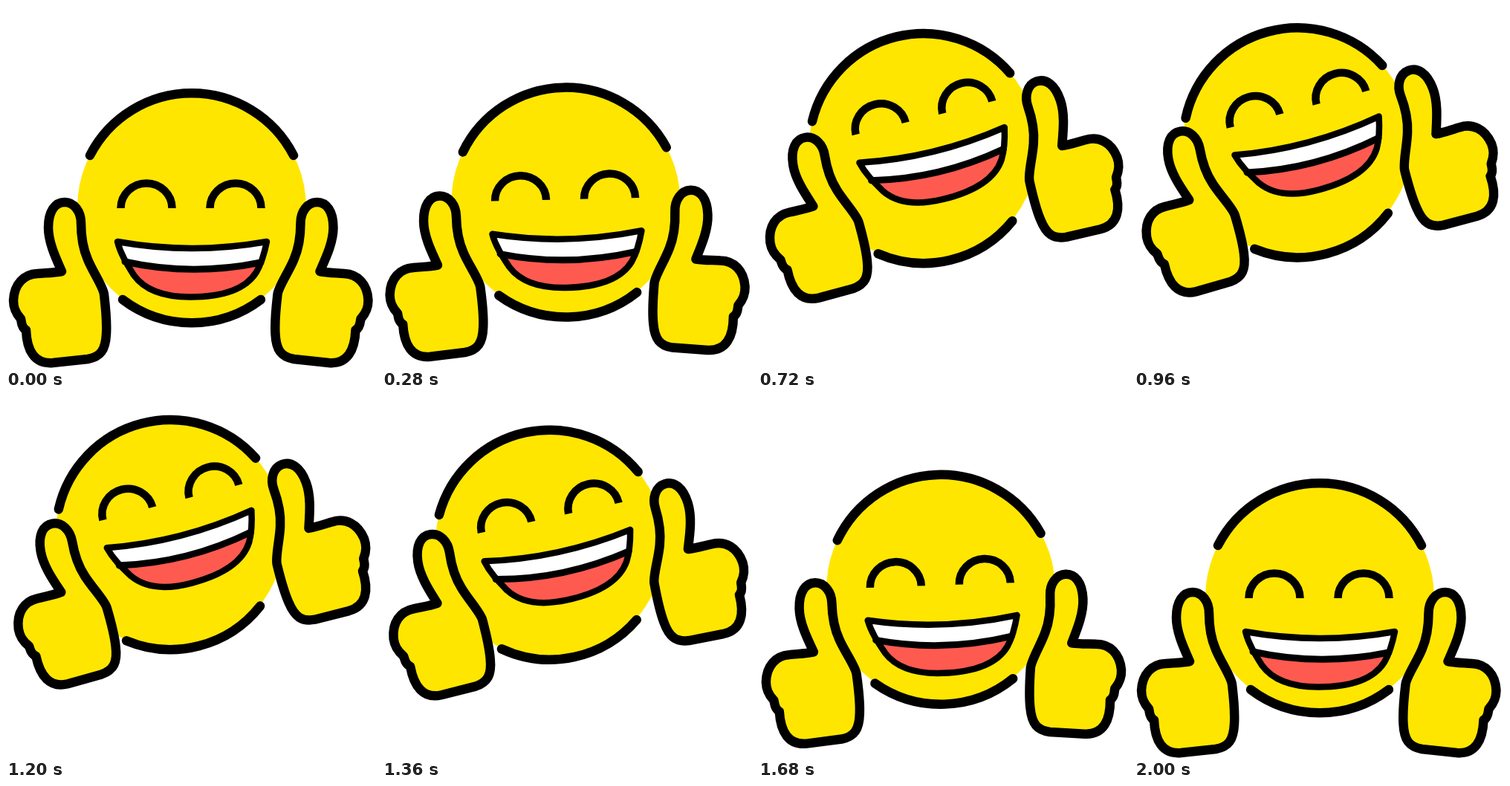
Recreate the animation shown at these times as an HTML page. Size 498 by 487 pixels, loop 2.04 s.

```html
<!DOCTYPE html>
<html lang="en">
<head>
<meta charset="utf-8">
<title>Thumbs up</title>
<style>
  html, body { margin: 0; width: 100%; height: 100%; overflow: hidden; background: #fff; }
  svg { display: block; width: 100%; height: 100%; }
  .line { fill: none; stroke: #000; }
</style>
</head>
<body>
<svg viewBox="0 0 498 487" stroke-linecap="round" stroke-linejoin="round">
  <defs>
    <path id="hand" fill="#ffe600" stroke="#000" stroke-width="12.5" d="M75 357
      C67 339 57 318 57 298 C57 276 66 264 79 264 C92 264 101 277 101 292
      C101 310 103 325 110 341 C117 358 131 378 132 388 C134 405 136 425 135 441
      C134 463 127 472 110 475 L63 480 C38 482 28 463 27 436
      C20 432 21 424 20 421 C12 412 10 405 10 396 C11 374 24 361 42 360
      C54 359 65 359 75 357Z"/>
  </defs>
  <g id="face">
    <circle cx="250" cy="271" r="154" fill="#ffe600"/>
    <path class="line" stroke-width="12.5" d="M113 201A154 154 0 0 1 387 201M157 395A154 154 0 0 0 343 395"/>
  </g>
  <g id="eyes">
    <path class="line" stroke-width="10.5" stroke-linecap="butt"
      d="M154.5 272A34.5 33.5 0 0 1 223.5 272M274.5 272A34.5 33.5 0 0 1 343.5 272"/>
  </g>
  <g id="mouth">
    <path fill="#fff" d="M150 317Q250 335 351 317L343 345Q250 364 160 344Z"/>
    <path fill="#ff5a50" d="M160 344Q250 364 343 345L337 358C322 382 291 391.5 248 391.5C210 391.5 185 380 172 362Z"/>
    <path class="line" stroke-width="9" d="M160 344Q250 364 343 345"/>
    <path class="line" stroke-width="8.5" d="M150 317Q250 335 351 317C348 332 344 346 337 358
      C322 382 291 391.5 248 391.5C210 391.5 185 380 172 362C162 346 154 333 150 317Z"/>
  </g>
  <g id="left"><use href="#hand"/></g>
  <g id="right"><use href="#hand" transform="translate(497.5) scale(-1 1)"/></g>
</svg>
<script>
  const LOOP = 2040, STEP = 40, HALF = 1000;

  // Each part swings by `angle` about its pivot while drifting by (dx, dy).
  const parts = [
    { id: 'face',  angle: -15, x: 250,   y: 271,   dx: -30, dy: -88 },
    { id: 'eyes',  angle: -15, x: 249,   y: 272,   dx: -28, dy: -133 },
    { id: 'mouth', angle: -15, x: 250.5, y: 317,   dx: -18, dy: -142.5 },
    { id: 'left',  angle: -10, x: 73,    y: 372.5, dx: 2,   dy: -96 },
    { id: 'right', angle: -21, x: 174.5, y: 372.5, dx: 6,   dy: -97 }
  ].map(part => ({ ...part, node: document.getElementById(part.id) }));

  const easeInOutCubic = u => u < 0.5 ? 4 * u ** 3 : 1 - 4 * (1 - u) ** 3;

  function draw(ms) {
    const t = Math.floor((ms % LOOP) / STEP) * STEP;
    const p = easeInOutCubic(1 - Math.abs(t - HALF) / HALF);
    for (const { node, angle, x, y, dx, dy } of parts) {
      node.setAttribute('transform',
        `translate(${dx * p} ${dy * p}) rotate(${angle * p} ${x} ${y})`);
    }
  }

  const start = performance.now();
  function tick() {
    draw(performance.now() - start);
    requestAnimationFrame(tick);
  }
  tick();
</script>
</body>
</html>
```
